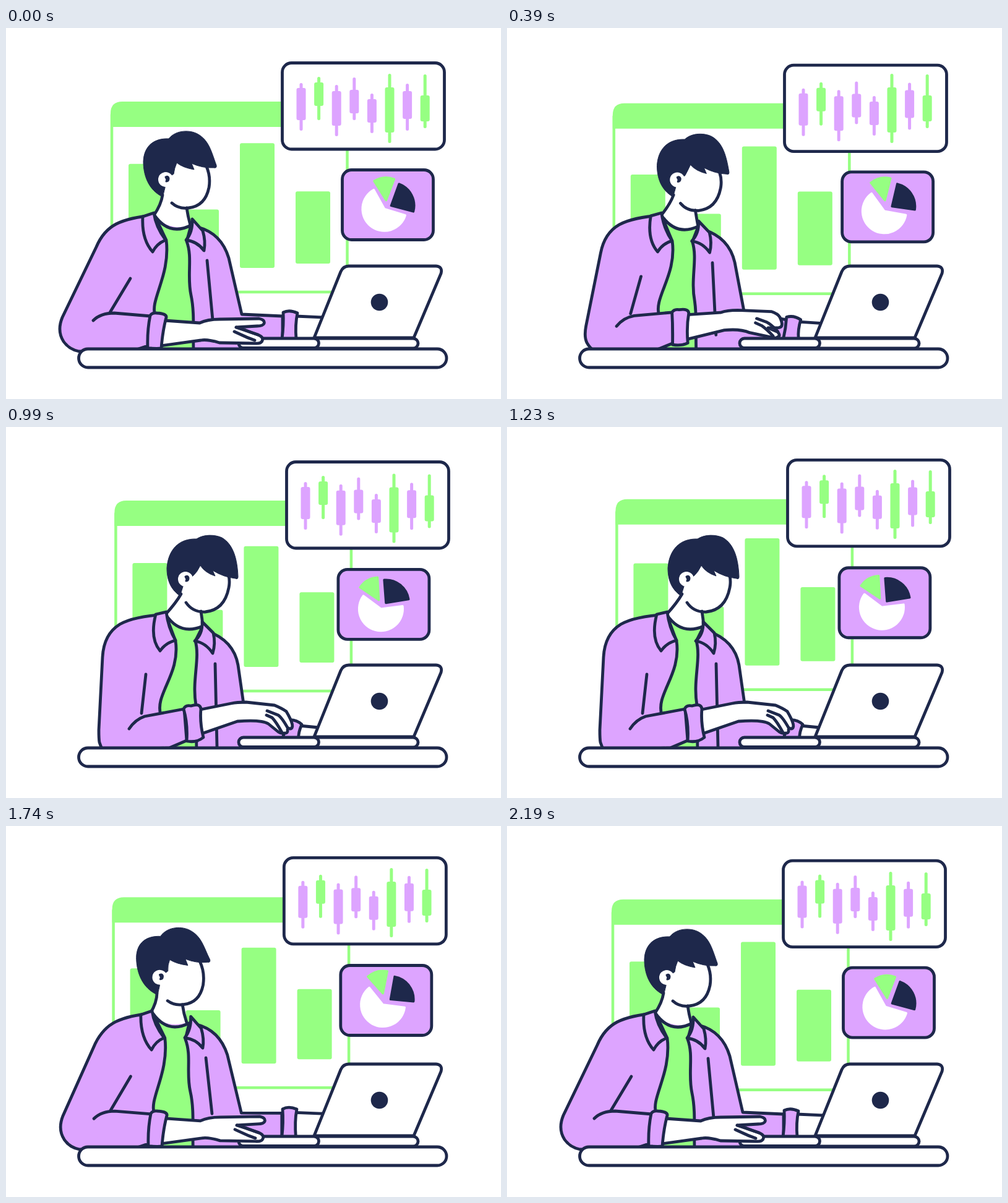
Recreate the animation shown at these times as an HTML page. Size 800 px wide and 600 px high, loop 2.22 s.

```html
<!DOCTYPE html>
<html lang="en">
<head>
<meta charset="utf-8">
<title>Market desk</title>
<style>
html, body { margin: 0; width: 100%; height: 100%; overflow: hidden; background: #fff; }
svg { display: block; width: 100vw; height: 100vh; }
</style>
</head>
<body>
<svg id="stage" viewBox="0 0 800 600" stroke-linecap="round" stroke-linejoin="round"></svg>
<script>
const LOOP = 2220, STEP = 30;
const NAVY = '#1e284b', PURPLE = '#dda4ff', GREEN = '#96ff82', WHITE = '#fff';
const stage = document.getElementById('stage');
const rad = deg => deg * Math.PI / 180;

// Eased value between [time, value] keys
function track(keys, t) {
  if (t <= keys[0][0]) return keys[0][1];
  for (let i = 1; i < keys.length; i++) {
    const [t0, v0] = keys[i - 1], [t1, v1] = keys[i];
    if (t < t1) {
      const u = (t - t0) / (t1 - t0);
      return v0 + (v1 - v0) * u * u * (3 - 2 * u);
    }
  }
  return keys[keys.length - 1][1];
}

// Blend two paths that share the same commands
function mix(a, b, k) {
  const num = /-?\d+(\.\d+)?/g, to = b.match(num);
  let i = 0;
  return a.replace(num, v => (+v + (to[i++] - v) * k).toFixed(2));
}

const shape = (d, fill = 'none', stroke = NAVY, width = 4.8) =>
  `<path d="${d}" fill="${fill}" stroke="${stroke}" stroke-width="${width}"/>`;
const box = (x, y, w, h, r, fill, stroke = 'none') =>
  `<rect x="${x}" y="${y}" width="${w}" height="${h}" rx="${r}" fill="${fill}" stroke="${stroke}" stroke-width="4.8"/>`;
const group = (x, y, body) => `<g transform="translate(${x} ${y})">${body}</g>`;

// Slow elliptic float of a panel
const float = (w, dx, dy, lag, body) =>
  group(dx * (1 - Math.cos(w)), dy * (Math.sin(w + lag) - Math.sin(lag)), body);

// x, bottom, mean top, swing, phase
const bars = [
  [198, 388, 227.7, 8.3, -15], [288, 388, 297.3, 4.5, 30],
  [378, 388, 192, 10, 55], [468, 381, 265, 4.8, 80]
];
// wick top, body top, body bottom, wick bottom, phase, colour
const candles = [
  [89, 97, 149, 166, -20, PURPLE], [79, 88, 126, 149, -20, GREEN],
  [92, 102, 158, 175, 0, PURPLE], [80, 100, 138, 149, 30, PURPLE],
  [106, 115, 153, 170, 60, PURPLE], [74, 96, 169, 186, 110, GREEN],
  [90, 102, 147, 166, 150, PURPLE], [75, 109, 151, 162, 110, GREEN]
];

function chartWindow(w) {
  let s = shape('M171,140 V427 H551.5 V140', WHITE, GREEN, 4.5) +
    shape('M169,160 V138 Q169,119 188,119 H534 Q553,119 553,138 V160Z', GREEN, 'none');
  for (const [x, bottom, mean, swing, phase] of bars) {
    const top = mean - swing * Math.cos(2 * w - rad(phase));
    s += box(x, top, 56, bottom - top, 3, GREEN);
  }
  return float(w, 3.3, 3.5, .17, s);
}

function candleCard(w) {
  let s = box(446.5, 56.5, 262, 139.5, 15, WHITE, NAVY);
  candles.forEach(([w0, b0, b1, w1, phase, color], i) => {
    const x = 477 + i * 28.6;
    const y = 2.9 * (Math.cos(rad(phase)) - Math.cos(2 * w - rad(phase)));
    s += group(x, y, box(-2.5, w0, 5, w1 - w0, 2.5, color) + box(-7.5, b0, 15, b1 - b0, 3, color));
  });
  return float(w, 3.6, 4.7, .17, s);
}

function slice(from, to, r, dist, dir, color) {
  const at = (deg, len) => [len * Math.cos(rad(deg)), len * Math.sin(rad(deg))];
  const [x, y] = at(dir, dist), [x0, y0] = at(from, r), [x1, y1] = at(to, r);
  const big = to - from > 180 ? 1 : 0;
  return shape(`M${x},${y} l${x0},${y0} A${r},${r} 0 ${big} 1 ${x + x1},${y + y1}Z`, color, color, 3.5);
}

function pieCard(w) {
  const burst = Math.sin(w) ** 2, turn = 12.5 * (Math.cos(w) - 1);
  const pie = slice(17, 241, 35.3, 3, 133, WHITE) +
    slice(-70, 15, 37.3, 9.5 + 3 * burst, -20, NAVY) +
    slice(-122, -69, 36.5, 12 + 4 * burst, -86, GREEN);
  return float(w, -3.4, 3.9, .06,
    box(543.5, 229.5, 147, 113, 15, PURPLE, NAVY) +
    `<g transform="translate(613.5 290.5) rotate(${turn})">${pie}</g>`);
}

function torso(lean, arm) {
  const m = (a, b) => mix(a, b, lean);
  return shape(m('M468,466 L515,468 L515,505 L468,505', 'M474,483 L505,486 L500,505 L470,505'), WHITE) +
    // jacket: shoulder, elbow, far side
    shape(m('M239,303 Q200,306 178,317 Q157,328 146,354', 'M258,303 Q207,306 184,319 Q158,335 156,372') +
      mix('L91,468 Q82,490 93,507 Q102,520 118,523', 'L150,490 Q150,505 151,510 Q153,516 156,523', arm) +
      m('L447,523 L447,466 L381,463 L360,372 Q348,332 310,322',
        'L455,523 L455,477 L385,455 L375,385 Q368,345 325,330'), PURPLE) +
    shape(m('M448,460 Q458,455 471,461 Q467,480 469,503 L446,503 Q449,480 448,460Z',
      'M455,474 Q468,472 478,481 Q472,495 473,503 L447,503 Q452,490 455,474Z'), PURPLE) +
    shape(m('M325,376 L334,472', 'M338,383 L341,517'));
}

function neckAndFace(k) {
  const m = (a, b) => mix(a, b, k);
  return shape(m('M252,220 L324,222 Q331,245 328,258 Q322,288 293,291 L298,319 Q265,330 239,303 Q251,285 253,270Z',
      'M284,226 L360,240 Q362,250 360,260 Q350,298 316,299 L318,322 Q280,336 258,303 Q275,284 283,270Z'), WHITE, 'none') +
    shape(m('M253,270 Q251,285 239,303', 'M283,270 Q275,284 258,303')) +
    shape(m('M292,291 Q294,305 298,319', 'M315,298 Q317,310 318,322')) +
    shape(m('M268,283 Q279,293 295,291 Q322,288 328,258 Q331,240 324,224',
      'M291,284 Q302,300 322,299 Q353,296 360,260 Q362,250 360,241'));
}

function clothes(k) {
  const m = (a, b) => mix(a, b, k);
  return shape(m('M240,303 Q264,337 299,319 L292,345 C302,372 292,400 299,432 C305,460 302,490 303,520 L250,520 L241,465 C232,440 266,400 259,343Z',
      'M258,303 Q281,338 318,322 L306,346 C314,375 300,410 307,450 C309,475 307,500 308,520 L262,520 L250,465 C240,432 282,400 274,346Z'), GREEN) +
    shape(m('M221,305 L239,299 Q242,322 258,343 Q244,348 237,362 Q219,342 221,305Z',
      'M242,303 L259,299 Q262,325 274,345 Q258,349 249,362 Q232,342 242,303Z'), PURPLE) +
    shape(m('M301,309 L318,328 Q323,345 320,360 Q309,345 291,343 Q302,330 301,309Z',
      'M317,315 L335,333 Q339,350 334,366 Q323,349 305,346 Q318,335 317,315Z'), PURPLE);
}

function hairAndEar(k) {
  const m = (a, b) => mix(a, b, k);
  return shape(m('M253,273 C230,262 222,238 222,216 C223,190 240,178 263,179 C275,164 298,165 309,171 C328,181 332,200 340,222 Q341,227 336,226 Q318,227 300,219 L304,229 Q286,226 276,218 Q272,227 271,236 L258,245 L257,258Z',
      'M281,273 C265,262 260,246 260,228 C262,200 278,180 308,181 C320,173 338,174 349,179 C368,190 374,215 375,242 Q375,247 371,245 Q352,243 334,232 L338,241 Q322,236 314,224 Q309,235 302,241 L290,246 L286,258Z'), NAVY, NAVY, 1) +
    `<circle cx="${258 + 32 * k}" cy="${245 + k}" r="12" fill="${WHITE}"/>` +
    shape(m('M258,241 Q262,239 263,243 Q263,248 259,248 L260,245Z', 'M290,242 Q294,240 295,244 Q295,249 291,249 L292,246Z'), NAVY, NAVY, 3);
}

const laptop =
  shape('M498,501 L541,394 Q545,385 554,385 H695 Q706,386 703,397 L659,501Z', WHITE) +
  `<circle cx="603.5" cy="443.5" r="13.8" fill="${NAVY}"/>` +
  box(490, 502, 176, 16, 8, WHITE, NAVY) + box(376, 502, 129.5, 15.5, 7.7, WHITE, NAVY);
const desk = box(117.5, 519, 594.5, 30, 15, WHITE, NAVY);

function nearArm(arm, reach) {
  const m = (a, b) => mix(a, b, reach);
  const sleeve = shape(mix('M201,405 L168,460', 'M226,400 L219,463', arm)) +
    shape(mix('M141,473 Q153,461 175,461 L234,466 L229,514 L211,520 L150,521',
      'M199,488 Q209,473 224,468 L288,456 L292,507 L264,519 L200,521', arm), PURPLE);
  const hand = shape(m('M256,473 L313,477 Q326,471 345,471 L409,470 Q419,472 417,478 Q415,482 406,482 L372,484 L407,496 Q417,500 414,506 Q412,511 402,510 L345,509 Q325,503 315,505 L250,514',
      'M314,457 L364,447 Q373,445 388,445 L434,450 Q446,455 453,460 Q469,487 459,488 L456,487 L455,489 Q456,496 450,495 Q446,497 440,493 L424,480 Q413,473 374,476 L316,496'), WHITE) +
    shape(m('M372,484 L385,488 Q395,492 407,496', 'M422,459 L440,466 Q446,470 456,488')) +
    shape(m('M369,491 L380,496 Q390,501 402,505', 'M421,466 L430,470 Q436,476 446,494'));
  const cuff = shape(m('M233,465 Q236,460 244,461 Q260,462 259,468 Q253,490 251,518 Q240,519 229,517 Q228,490 233,465Z',
    'M287,456 Q290,449 299,451 Q314,446 315,456 Q313,478 319,502 Q308,511 292,508 Q294,480 287,456Z'), PURPLE);
  const shift = arm - reach;
  return sleeve + group(55 * shift, 0, group(0, -8 * shift, hand) + cuff);
}

function draw(t) {
  const w = 2 * Math.PI * t / LOOP;
  const head = track([[100, 0], [210, -.05], [560, 1.08], [900, 1], [1470, 1], [1720, -.3], [2150, 0]], t);
  const lean = head < 0 ? head / 2 : Math.min(head, 1);
  const arm = track([[100, 0], [560, .9], [990, 1], [1290, 1], [1780, 0]], t);
  stage.innerHTML = chartWindow(w) + candleCard(w) + pieCard(w) +
    torso(lean, arm) + neckAndFace(head) + clothes(lean) + hairAndEar(head) +
    laptop + nearArm(arm, Math.max(0, lean)) + desk;
}

function tick(now) {
  draw(Math.floor(now % LOOP / STEP) * STEP);
  requestAnimationFrame(tick);
}
draw(0);
requestAnimationFrame(tick);
</script>
</body>
</html>
```
